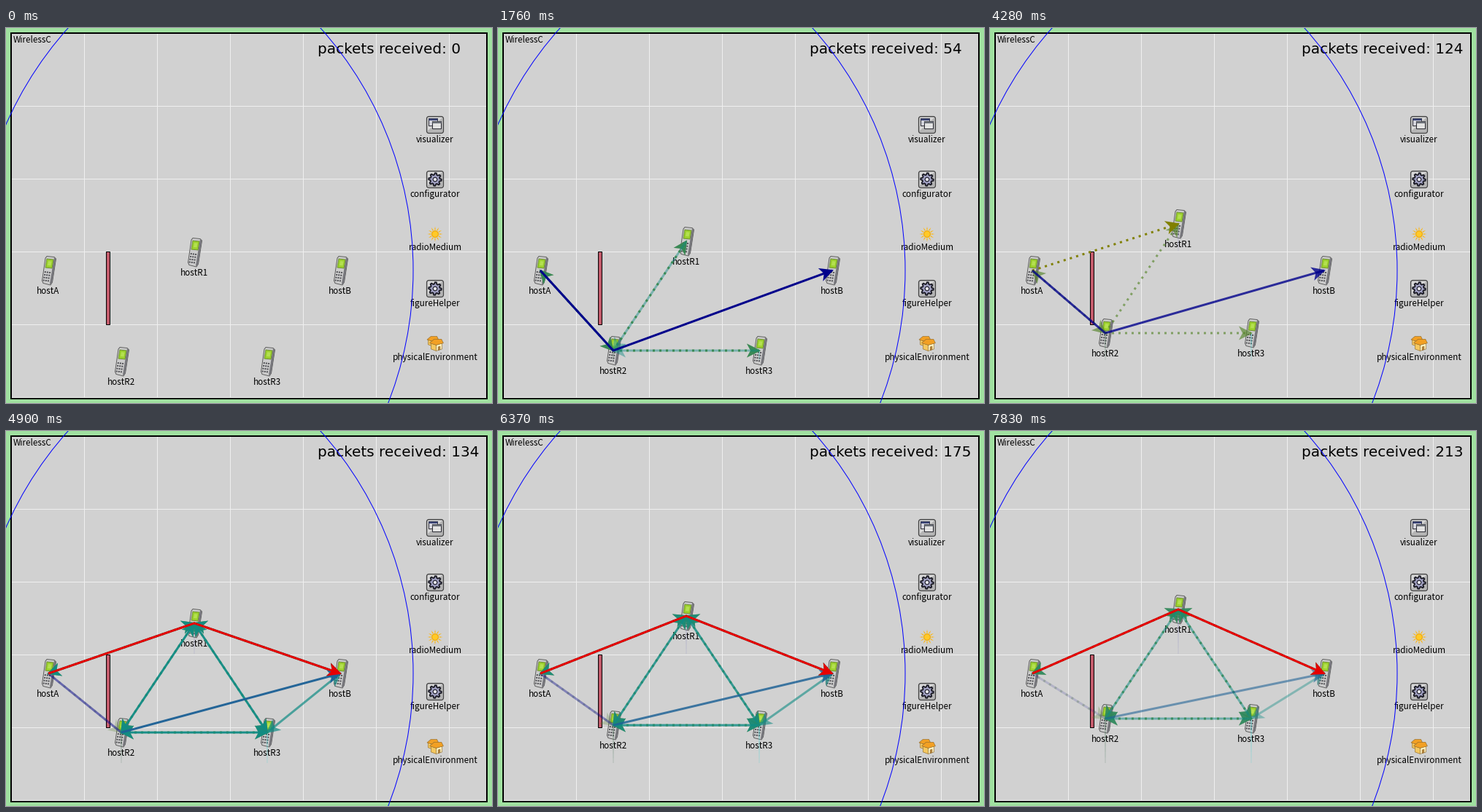
Write a matplotlib script that moves like this. It is 666x515 px and loops after 8 s.

```python
import numpy as np
import matplotlib.pyplot as plt
from matplotlib.animation import FuncAnimation
from matplotlib.collections import LineCollection, PolyCollection
from matplotlib.patches import Circle, FancyBboxPatch, Polygon, Rectangle
from matplotlib.transforms import Affine2D

W, H, DPI = 666, 515, 100
LOOP, STEP = 8000, 40
PX = 72 / DPI

# One entry per simulation snapshot: start time, distance moved, packet count.
STARTS = [0, 500, 1130, 1760, 2390, 3020, 3650, 4280, 4900, 5740, 6370, 7000, 7830]
MOVED = [0, 5, 10, 15, 20, 25, 30, 39, 44, 50, 54, 58.5, 63]
PACKETS = [0, 15, 34, 54, 73, 92, 108, 124, 134, 155, 175, 193, 213]

HOSTS = {"A": (58, 333), "B": (458, 333), "R1": (258, 308),
         "R2": (158, 458), "R3": (358, 458)}
TRAILS = {"R1": "#8a8ac0", "R2": "#3f6f4f", "R3": "#30d8d8"}

NAVY, RED, OLIVE = "#00008b", "#e60000", "#808000"
GREEN, TEAL, BLUE = "#558428", "#108c84", "#1e6296"

plt.rcParams["path.snap"] = False
fig = plt.figure(figsize=(W / DPI, H / DPI), dpi=DPI, facecolor="#a0e0a0")
ax = fig.add_axes([0, 0, 1, 1])
ax.set(xlim=(0, W), ylim=(H, 0))
ax.axis("off")


def label(x, y, text, ha="center"):
    return ax.text(x, y, text, family="Noto Sans CJK JP", size=11.7 * PX,
                   ha=ha, va="baseline", zorder=5)


def poly(points, color, edge="none", lw=0.0, z=4):
    ax.add_patch(Polygon(points, fc=color, ec=edge, lw=lw * PX, zorder=z))


def draw_stage():
    ax.add_patch(Rectangle((7, 7), 652, 502, fc="#d1d1d1", ec="none", zorder=0))
    for x in range(107, 659, 100):
        ax.plot([x + .5] * 2, [8, 508], color="#efefef", lw=PX, zorder=1)
    for y in range(107, 508, 100):
        ax.plot([8, 658], [y + .5] * 2, color="#efefef", lw=PX, zorder=1)
    ax.add_patch(Rectangle((7, 7), 652, 502, fill=False, ec="black",
                           lw=2 * PX, zorder=2))
    ax.add_patch(Rectangle((137.5, 307.5), 5, 100, fc="#c45c6c",
                           ec="black", lw=PX, zorder=3))
    for name in "AB":
        ax.add_patch(Circle(HOSTS[name], 500, fill=False, ec="#0000ff",
                            lw=PX, zorder=6))
    label(10, 20, "WirelessC", "left")


def button(y):
    ax.add_patch(FancyBboxPatch((579, y - 9), 18, 18,
                                boxstyle="round,pad=2.5,rounding_size=3",
                                fc="#b4b4b4", ec="#444444", lw=1.2 * PX, zorder=4))
    poly([(578, y - 10), (598, y - 10), (578, y + 8)], "#d8d8d8")


def star(x, y, spikes, inner, outer, flat=False):
    if flat:
        angle = np.linspace(0, 2 * np.pi, 4 * spikes, endpoint=False)
        radius = np.tile([outer, outer, inner, inner], spikes)
    else:
        angle = np.linspace(0, 2 * np.pi, 2 * spikes, endpoint=False)
        radius = np.tile([outer, inner], spikes)
    return np.column_stack([x + radius * np.cos(angle), y + radius * np.sin(angle)])


def gear(y):
    button(y)
    poly(star(588, y, 8, 6.5, 8.8, True), "#a4a4c6", "#1c1c26", 1.9)
    ax.add_patch(Circle((588, y), 2.8, fc="#e8e8f0", ec="#2a2a36",
                        lw=1.3 * PX, zorder=4))


def windows(y):
    button(y)
    for x, top, face, bar in ((579.5, y - 8.5, "#d4d4dc", "#3c4678"),
                              (584.5, y - 4.5, "#e2e2e2", "#70747c")):
        ax.add_patch(Rectangle((x, top), 12, 10, fc=face, ec="#2c2c34",
                               lw=PX, zorder=4))
        ax.add_patch(Rectangle((x, top), 12, 2.5, fc=bar, ec="none", zorder=4))


def sun(y):
    poly(star(588, y, 12, 4.5, 10.5), "#fbb81c")
    ax.add_patch(Circle((588, y), 6, fc="#dcd2b0", ec="none", zorder=4))
    ax.add_patch(Circle((588, y), 4.4, fc="#ffc928", ec="#f0a400", lw=PX, zorder=4))


def house(x, y, s):
    for points, color in (
            ([(-8, -2), (0, 1), (0, 10), (-8, 7)], "#f4c860"),
            ([(0, 1), (9, -2), (9, 7), (0, 10)], "#fdeebc"),
            ([(-10, -2), (-3, -8), (8, -8), (11, -2), (0, 1)], "#f2a024"),
            ([(3, 4), (6, 3), (6, 8), (3, 9)], "#b8843c")):
        poly(np.array(points) * s + (x, y), color, "#8f6a2c", .6)


def draw_modules():
    windows(133)
    gear(208)
    sun(283)
    gear(358)
    house(584.5, 429.5, .75)
    house(589.5, 434.5, .9)
    for name, y in (("visualizer", 157), ("configurator", 232), ("radioMedium", 305),
                    ("figureHelper", 382), ("physicalEnvironment", 456)):
        label(588, y, name)


def phone_parts():
    body = [(-4, -17), (-2, -19.5), (8, -18.5), (10.5, -16), (5.5, 16),
            (3, 20), (-7, 17.5), (-8.5, 14)]
    side = [(8, -18), (10.5, -16), (5.5, 16), (3, 20), (2, 18)]
    screen = [(-2, -16), (7, -15), (5, -3), (-4, -4)]
    glare = [(0, -13), (4.5, -12.5), (3.5, -6.5), (-1, -7)]
    parts = [(body, "#cccccc", "#555555"), (side, "#77777c", "none"),
             (screen, "#9bd02c", "#6a8a30"), (glare, "#b4e050", "none")]
    for row in range(4):
        for col in range(3):
            x, y = -5 + 3.1 * col - .7 * row, 1 + 3.8 * row + .4 * col
            key = [(x, y), (x + 2, y + .3), (x + 1.6, y + 2.2), (x - .4, y + 1.9)]
            parts.append((key, "#4d4d52", "none"))
    return zip(*parts)


def make_phone():
    verts, faces, edges = phone_parts()
    move = Affine2D()
    ax.add_collection(PolyCollection(verts, facecolors=faces, edgecolors=edges,
                                     linewidths=.9 * PX, zorder=4,
                                     transform=move + ax.transData), autolim=False)
    return move


def place(name, moved):
    x, y = HOSTS[name]
    return np.array([x, y - moved * (name in TRAILS)], float)


def link(spots, path, color, alpha=1.0, dotted=False, both=False, heads=True):
    """Polyline through named hosts with an arrowhead at its end(s)."""
    if alpha <= 0:
        return []
    pts = np.array([spots[n] for n in path])
    style = (0, (1, 2)) if dotted else "-"
    made = ax.plot(*pts.T, color=color, alpha=alpha, lw=3 * PX, ls=style, zorder=8,
                   solid_capstyle="butt", dash_capstyle="butt")
    ends = [(pts[-2], pts[-1])] + ([(pts[1], pts[0])] if both else [])
    for start, end in ends if heads else []:
        u = (end - start) / np.hypot(*(end - start))
        n = np.array([-u[1], u[0]])
        tip = end + 2 * u
        shape = [tip, tip - 19 * u + 9.5 * n, tip - 14 * u, tip - 19 * u - 9.5 * n]
        made.append(ax.add_patch(Polygon(shape, fc=color, ec="none",
                                         alpha=alpha, zorder=8)))
    return made


def draw_links(state, spots):
    made = []

    def add(path, *args, **kwargs):
        made.extend(link(spots, path.split(), *args, **kwargs))

    if state == 0:
        return made
    if state < 8:
        dots, fresh = (.65 if state == 7 else .95), max(0, .9 - .15 * state)
        for path in ("R2 R1", "R2 R3", "R2 A"):
            add(path, GREEN, dots, dotted=True, both=path == "R2 A")
            add(path, TEAL, fresh, both=True)
        if state == 7:
            add("A R1", OLIVE, dotted=True)
        add("A R2 B", NAVY, .8 if state == 7 else 1)
        return made

    age = max(0, state - 9)
    add("A R2", GREEN, .25, dotted=True)
    add("A R2", NAVY, .5 - .12 * age, heads=False)
    add("R3 B", TEAL, .7 - .1 * age, both=True)
    for path in ("R1 A", "R1 B", "R1 R2", "R1 R3", "R2 R3"):
        add(path, GREEN, .85, dotted=True, both=True)
        add(path, TEAL, .95 - .14 * age, both=True)
    add("R2 B", BLUE, .97 - .13 * age)
    add("A R1 B", RED)
    return made


def draw_trails(spots, moved):
    made = []
    for name, color in TRAILS.items():
        x, bottom = HOSTS[name]
        ys = np.linspace(spots[name][1], bottom - 2, 9)
        if moved < 5:
            continue
        segments = [[(x, a), (x, b)] for a, b in zip(ys, ys[1:])]
        line = LineCollection(segments, colors=color, linewidths=1.5 * PX,
                              alpha=np.linspace(.45, .15, 8), zorder=7)
        made.append(ax.add_collection(line, autolim=False))
    return made


draw_stage()
draw_modules()
phones = {name: make_phone() for name in HOSTS}
labels = {name: label(x, y + 32, "host" + name) for name, (x, y) in HOSTS.items()}
counter = ax.text(427.3, 35, "", family="DejaVu Sans", size=20 * PX,
                  va="baseline", zorder=5)
overlay = []


def update(frame):
    now = frame * STEP + STEP - 1
    state = int(np.searchsorted(STARTS, now, side="right")) - 1
    moved = MOVED[state]
    spots = {name: place(name, moved) for name in HOSTS}
    while overlay:
        overlay.pop().remove()
    for name, (x, y) in spots.items():
        phones[name].clear().translate(x, y)
        labels[name].set_y(y + 32)
    counter.set_text(f"packets received: {PACKETS[state]}")
    overlay.extend(draw_trails(spots, moved))
    overlay.extend(draw_links(state, spots))
    return overlay


anim = FuncAnimation(fig, update, frames=LOOP // STEP, interval=STEP,
                     init_func=lambda: [], repeat=True, repeat_delay=0)
plt.show()
```
